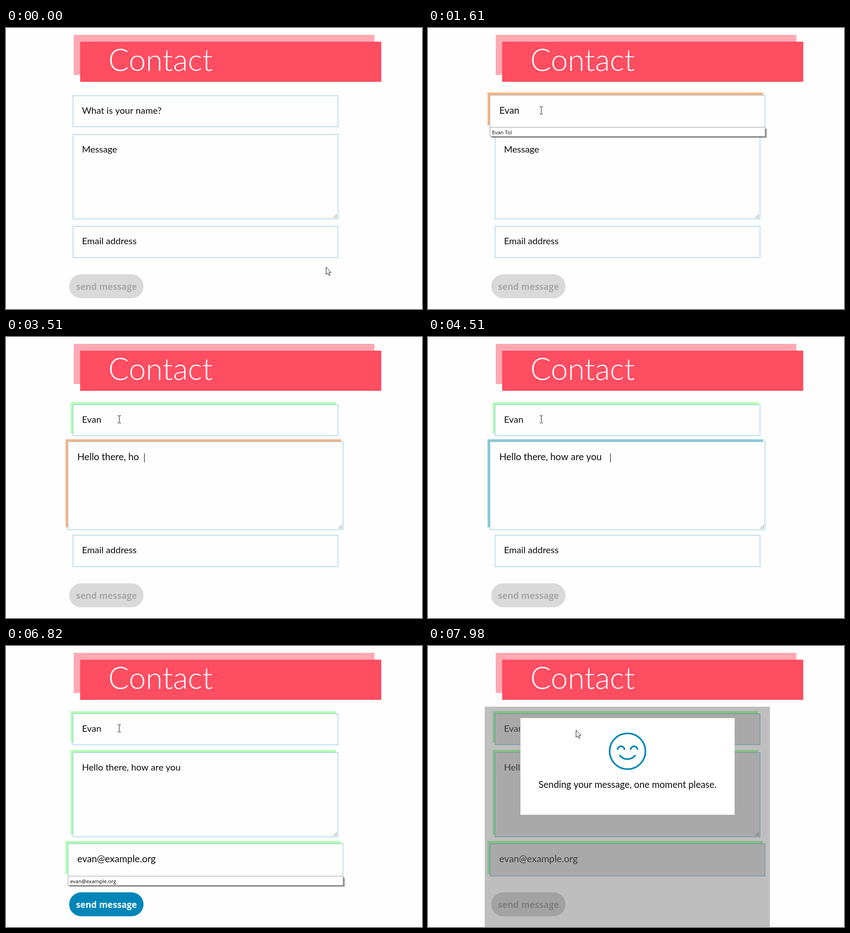
An HTML page with a canvas for the animation above (8 s loop, 909 by 616 pixels).

```html
<!DOCTYPE html>
<html lang="en">
<head>
<meta charset="utf-8">
<title>Contact form</title>
<style>
  html, body { margin: 0; width: 100%; height: 100%; overflow: hidden; background: #fefefe; }
  canvas { display: block; }
</style>
</head>
<body>
<canvas id="stage" width="909" height="616"></canvas>
<script>
const ctx = document.getElementById('stage').getContext('2d');
const LOOP = 8000, MOVE = 250, ZOOM = 0.038;
const DISABLED = 7420;
const BODY = '20px Lato, sans-serif';
const SMALL = '11.3px "Open Sans", sans-serif';
const PAGE = '#fefefe', BLUE = [138, 198, 219], ORANGE = [255, 178, 128], GREEN = [178, 255, 178];
const GREY = [217, 217, 217], ACTION = [0, 133, 185];

const clamp = v => Math.max(0, Math.min(1, v));
const smooth = v => { v = clamp(v); return v * v * (3 - 2 * v); };
const span = (t, from, ms) => smooth((t - from) / ms);
const lerp = (a, b, k) => a + (b - a) * k;
const mix = (a, b, k) => a.map((v, i) => lerp(v, b[i], k));
const rgb = c => `rgb(${c.map(Math.round).join(',')})`;

// Each key(i) gives the moment at which character i is typed.
const fields = [
  {
    y: 148, h: 69, base: 40, hint: 'What is your name?', text: 'Evan',
    on: 305, off: 1610, valid: 1610, option: 'Evan Tol', listEnd: 1750,
    key: i => [830, 1050, 1150, 1290][i]
  },
  {
    y: 233, h: 186, base: 39.5, hint: 'Message', text: 'Hello there, how are you',
    on: 1620, off: 4600, valid: 4600, grip: true,
    key: i => i < 12 ? 2150 + i * 91 : i < 15 ? [3310, 3370, 3510][i - 12] : 3600 + (i - 15) * 90
  },
  {
    y: 434, h: 70, base: 40, hint: 'Email address', text: 'evan@example.org',
    on: 4600, off: Infinity, valid: 5950, option: 'evan@example.org', listEnd: 7330,
    key: i => i < 5 ? [5110, 5320, 5410, 5520, 5660][i]
      : i < 9 ? 5940 + (i - 5) * 65
      : i < 13 ? 6190 + (i - 9) * 95
      : 6670 + (i - 13) * 50
  }
];

function box(color, x, y, w, h) {
  ctx.fillStyle = color;
  ctx.fillRect(x, y, w, h);
}

function write(text, x, y, font, color, align = 'left') {
  ctx.font = font;
  ctx.fillStyle = color;
  ctx.textAlign = align;
  ctx.fillText(text, x, y);
}

// Shadow colour of a focused field: swings from blue to orange and back.
function pulse(ms) {
  return mix(BLUE, ORANGE, span(ms, 500, 330) - span(ms, 1860, 330));
}

function drawHeader() {
  box('#ffa9b3', 148, 15, 657, 88);
  box('#ff4d62', 162, 30, 658, 88);
  write('Contact', 223.5, 94, '300 67px Lato, sans-serif', '#fff');
}

function drawGrip(x, y) {
  for (let r = 0; r < 3; r++)
    for (let c = 0; c <= r; c++) box('#a8a8a8', x - 5 - c * 3, y - 11 + r * 3, 2, 2);
}

function drawList(f, x, y, w) {
  box('rgba(0,0,0,.22)', x + 4, y + 4, w, 20);
  box('rgba(0,0,0,.3)', x + 3, y + 3, w - 1, 20);
  box('#fff', x, y, w, 21);
  ctx.strokeStyle = '#9a9a9a';
  ctx.strokeRect(x + .5, y + .5, w - 1, 20);
  write(f.option, x + 5, y + 15.5, SMALL, '#000');
}

function drawField(f, t) {
  const focus = span(t, f.on, MOVE) - span(t, f.off, MOVE);
  const s = 1 + ZOOM * focus, cx = 436, cy = f.y + f.h / 2;
  const left = cx - 290 * s, top = cy - f.h / 2 * s;
  const x = Math.round(left), y = Math.round(top);
  const w = Math.round(cx + 290 * s) - x, h = Math.round(cy + f.h / 2 * s) - y;
  const off = t >= DISABLED;

  const grow = span(t, f.on, MOVE);
  if (grow > 0) {
    const tint = mix(pulse(Math.min(t, f.off) - f.on), GREEN, span(t, f.valid, MOVE));
    box(rgb(tint), left - 4.7 * s * grow, top - 5 * s * grow, 580 * s, f.h * s);
  }
  box(off ? '#e3e3e3' : PAGE, x, y, w, h);
  ctx.strokeStyle = '#7fc3d6';
  ctx.lineWidth = 1;
  ctx.strokeRect(x + .5, y + .5, w - 1, h - 1);
  if (f.grip) drawGrip(x + w, y + h);

  let n = 0;
  while (n < f.text.length && t >= f.key(n)) n++;
  const shown = f.text.slice(0, n);
  const label = n ? shown : t < f.on ? f.hint : '';
  const tx = 166, ty = f.y + f.base;
  ctx.save();
  ctx.translate(cx, cy);
  ctx.scale(s, s);
  ctx.translate(-cx, -cy);
  write(label, tx, ty, BODY, off ? '#505050' : '#0c0c0c');
  ctx.restore();

  const last = n ? f.key(n - 1) : f.on;
  const blink = Math.floor((t - last) / 500) % 2 === 0;
  const finished = f.off === Infinity && n === f.text.length;
  if (t >= f.on && t < f.off && blink && !finished) {
    const px = tx + (n ? ctx.measureText(shown).width : 0);
    box('#000', Math.round(cx + (px - cx) * s), Math.round(cy + (ty - 15 - cy) * s), 1, 20);
  }
  return { x, y, w, h, list: f.option && n > 0 && t < f.listEnd };
}

function drawButton(t) {
  const k = t < DISABLED ? span(t, 5960, 220) : 0;
  ctx.fillStyle = rgb(mix(GREY, ACTION, k));
  ctx.beginPath();
  ctx.roundRect(138, 540, 162.5, 52.5, 26.2);
  ctx.fill();
  write('send message', 219.5, 574, 'bold 19.1px "Open Sans", sans-serif',
    rgb(mix([169, 169, 169], [255, 255, 255], k)), 'center');
}

function arc(x, y, r, from, to) {
  ctx.beginPath();
  ctx.arc(x, y, r, from * Math.PI, to * Math.PI);
  ctx.stroke();
}

function drawNotice(t) {
  const k = clamp((t - 7460) / 480);
  if (!k) return;
  box(`rgba(0,0,0,${.255 * k})`, 124, 133, 623, 483);
  ctx.save();
  ctx.globalAlpha = k;
  box('#fff', 202, 158, 468, 212);
  ctx.strokeStyle = rgb(ACTION);
  ctx.lineWidth = 3.6;
  ctx.lineCap = 'round';
  arc(436, 230.7, 39.2, 0, 2);
  arc(421.7, 227.5, 7.6, 1.06, 1.94);
  arc(450.3, 227.5, 7.6, 1.06, 1.94);
  arc(436, 226.5, 21.5, .22, .78);
  write('Sending your message, one moment please.', 436, 310.5, '20.4px Lato, sans-serif', '#0c0c0c', 'center');
  ctx.restore();
}

function drawArrow(x, y) {
  ctx.save();
  ctx.translate(x + .5, y + .5);
  ctx.beginPath();
  [[0, 0], [0, 16], [3.7, 12.6], [6.2, 18], [8.6, 17], [6.2, 11.6], [11, 11.3]]
    .forEach(p => ctx.lineTo(...p));
  ctx.closePath();
  ctx.fillStyle = '#fff';
  ctx.strokeStyle = '#111';
  ctx.lineWidth = 1;
  ctx.fill();
  ctx.stroke();
  ctx.restore();
}

function drawBeam(x, y) {
  box('#111', x, y - 7, 1, 15);
  for (const dy of [-8, 8]) {
    box('#111', x - 3, y + dy, 3, 1);
    box('#111', x + 1, y + dy, 3, 1);
  }
}

// Stops: start time, duration, destination.
const path = [[40, 270, 247, 180], [6880, 380, 228, 560], [7500, 440, 323, 184]];

function drawPointer(t) {
  let x = 699, y = 524;
  for (const [from, ms, toX, toY] of path) {
    const k = span(t, from, ms);
    x = lerp(x, toX, k);
    y = lerp(y, toY, k);
  }
  x = Math.round(x);
  y = Math.round(y);
  const inside = fields.some(f => x > 146 && x < 726 && y > f.y && y < f.y + f.h);
  if (inside && t < DISABLED) drawBeam(x, y);
  else drawArrow(x, y);
}

function draw(t) {
  box(PAGE, 0, 0, 909, 616);
  drawHeader();
  drawButton(t);
  const boxes = fields.map(f => drawField(f, t));
  boxes.forEach((b, i) => {
    if (b.list) drawList(fields[i], b.x, b.y + b.h - 1, b.w);
  });
  drawNotice(t);
  drawPointer(t);
}

const start = performance.now();
function tick() {
  draw((performance.now() - start) % LOOP);
  requestAnimationFrame(tick);
}
tick();
</script>
</body>
</html>
```
